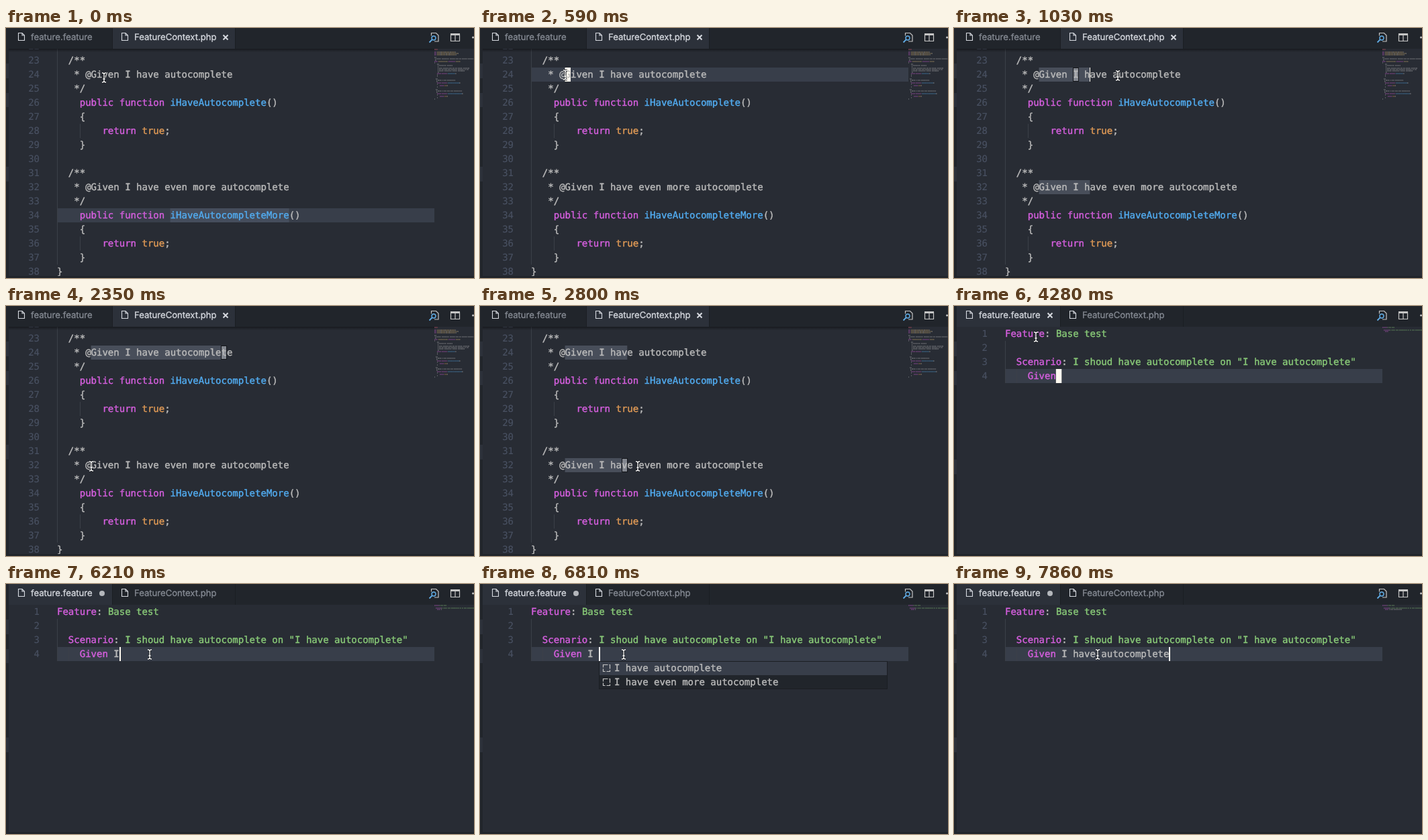
Animation of 697 by 373 pixels, one loop 8000 ms. Source, as an HTML page:

```html
<!DOCTYPE html>
<html lang="en">
<head>
<meta charset="utf-8">
<title>Editor step completion</title>
<style>
html, body { margin: 0; width: 100%; height: 100%; overflow: hidden; background: #282c34; }
svg { display: block; width: 697px; height: 373px; }
text { white-space: pre; text-rendering: geometricPrecision; }
text, tspan { fill: currentColor; stroke: currentColor; }
.code, .num { font: 14px "DejaVu Sans Mono", monospace; stroke-width: .4px; }
.num { stroke-width: .15px; }
.ui { font: 13.1px Inter, "Open Sans", sans-serif; stroke-width: .3px; }
</style>
</head>
<body>
<svg id="stage" viewBox="0 0 697 373"></svg>
<script>
const LOOP = 8000, LEFT = 76, CHAR = 8.428, ROW = 21;
const C = {
  bg: '#282c34', bar: '#21252b', tab: '#2c313a', edge: '#1b1e23', line: '#383e4a',
  sel: '#484e5a', word: '#454d5c', guide: '#3b4048', num: '#495162', text: '#bbbbbb',
  key: '#d55fde', fn: '#52adf2', str: '#89ca78', lit: '#e09a56', type: '#e5c07b',
  red: '#ef596f', cursor: '#fffaf0', block: '#83878f'
};

const phpLines = `<?php

use Behat\\Behat\\Context\\Context;
use Behat\\Gherkin\\Node\\PyStringNode;
use Behat\\Gherkin\\Node\\TableNode;

/**
 * Defines application features from the specific context.
 */
class FeatureContext implements Context
{
    /**
     * Initializes context.
     *
     * Every scenario gets its own context instance.
     * You can also pass arbitrary arguments to the
     * context constructor through behat.yml.
     */
    public function __construct()
    {
    }

  /**
   * @Given I have autocomplete
   */
    public function iHaveAutocomplete()
    {
        return true;
    }

  /**
   * @Given I have even more autocomplete
   */
    public function iHaveAutocompleteMore()
    {
        return true;
    }
}`.split('\n');

const featureLines = [
  'Feature: Base test', '',
  '  Scenario: I shoud have autocomplete on "I have autocomplete"'
];

// Each entry overrides parts of the state before it.
const steps = [
  { t: 0, php: true, mouse: [146, 74], line: 34, word: [34, 20, 21], typed: '    Given ' },
  { t: 140, mouse: [138, 70] },
  { t: 440, mouse: [127, 70] },
  { t: 590, line: 24, word: null, block: [24, 6] },
  { t: 740, mouse: [142, 70], line: 0, sel: [24, 8], block: [24, 7] },
  { t: 890, mouse: [188, 71], sel: [24, 13], block: [24, 12] },
  { t: 1030, mouse: [244, 71], sel: [24, 15], caret: [24, 15] },
  { t: 1180, mouse: [295, 70], sel: [24, 23], block: [24, 22], caret: null },
  { t: 1330, mouse: [321, 68], sel: [24, 29], block: [24, 28] },
  { t: 1480, mouse: [327, 67], sel: [24, 30], block: [24, 29] },
  { t: 1620, mouse: [318, 88] },
  { t: 1770, mouse: [272, 150] },
  { t: 1920, mouse: [205, 215] },
  { t: 2070, mouse: [152, 252] },
  { t: 2200, mouse: [133, 259] },
  { t: 2350, mouse: [127, 239] },
  { t: 2500, line: 32, sel: null, block: [32, 6] },
  { t: 2650, mouse: [146, 238], line: 0, sel: [32, 8], block: [32, 7] },
  { t: 2800, mouse: [235, 239], sel: [32, 17], block: [32, 16] },
  { t: 2950, mouse: [355, 239], sel: [32, 32], block: [32, 31] },
  { t: 3100, mouse: [418, 239], sel: [32, 41], block: [32, 40] },
  { t: 3390, mouse: [370, 186] },
  { t: 3540, mouse: [245, 100] },
  { t: 3690, mouse: [140, 40] },
  { t: 3840, mouse: [105, 19], hand: true },
  { t: 4140, php: false, line: 4, sel: null, block: [4, 9] },
  { t: 4280, mouse: [122, 46], hand: false },
  { t: 4430, mouse: [184, 90] },
  { t: 4580, mouse: [214, 105], word: [4, 4, 5] },
  { t: 5020, block: null, caret: [4, 10] },
  { t: 5170, word: null },
  { t: 5760, caret: null },
  { t: 6210, typed: '    Given I', caret: [4, 11], dirty: true },
  { t: 6660, typed: '    Given I ', caret: [4, 12] },
  { t: 6810, popup: true },
  { t: 7260, caret: null },
  { t: 7860, typed: '    Given I have autocomplete', caret: [4, 29], popup: false }
];

const rect = (x, y, w, h, fill, more = '') =>
  `<rect x="${x}" y="${y}" width="${w}" height="${h}" fill="${fill}" ${more}/>`;
const path = (d, stroke, width = 1, more = 'fill="none"') =>
  `<path d="${d}" stroke="${stroke}" stroke-width="${width}" ${more}/>`;
const escape = s => s.replace(/&/g, '&amp;').replace(/</g, '&lt;');
const label = (x, y, s, color, cls, more = '') =>
  `<text x="${x}" y="${y}" color="${color}" class="${cls}" ${more}>${escape(s)}</text>`;
const colX = col => LEFT + col * CHAR;

function phpColor(word, line) {
  if (/^\s*(\/?\*)/.test(line)) return C.text;
  if (/^(public|function|return|class|use|implements)$/.test(word)) return C.key;
  if (word === 'true') return C.lit;
  if (line.startsWith('<?')) return C.red;
  if (/^(use|class)/.test(line) && /\w/.test(word)) return C.type;
  return /^\w+$/.test(word) ? C.fn : C.text;
}

function tokens(line, php) {
  if (php) return line.split(/(\w+)/).map(s => [s, phpColor(s, line)]);
  const [, indent, key, rest] = line.match(/^(\s*)(\w*)(.*)$/);
  if (key === 'Given') return [[indent, C.text], [key, C.key], [rest, C.text]];
  return [[indent, C.text], [key, C.key], [rest.slice(0, 1), C.text], [rest.slice(1), C.str]];
}

function codeRow(line, y, php) {
  const spans = tokens(line, php).map(([s, color]) => `<tspan color="${color}">${escape(s)}</tspan>`);
  return `<text x="${LEFT}" y="${y + 15}" class="code">${spans.join('')}</text>`;
}

function minimap(lines, php) {
  let out = '';
  lines.forEach((line, i) => {
    let col = 0;
    for (const [s, color] of tokens(line, php)) {
      for (const m of s.matchAll(/\S+/g))
        out += path(`M${638 + col + m.index} ${32 + i * 2}h${m[0].length}`, color, 1.2,
          'stroke-dasharray="1.6 .6" opacity=".62"');
      col += s.length;
    }
  });
  return out;
}

function fileIcon(x, color) {
  return path(`M${x + .5} 7.5h5.5l3.5 3.5v7.5h-9zM${x + 6} 7.5v3.5h3.5`, color, 1.1);
}

const cross = x => path(`M${x - 3.5} 10.5l7 7m0-7l-7 7`, '#d7dae0', 2);

function tabs(s) {
  const on = '#d7dae0', off = '#868b94';
  const first = s.php ? off : on, second = s.php ? on : off;
  let out = rect(0, 0, 697, 31, C.bar);
  out += s.php ? rect(159, 0, 182, 31, C.tab) : rect(4, 0, 154, 31, C.tab);
  out += rect(158, 0, 1, 31, C.edge) + rect(341, 0, 1, 31, C.edge);
  out += fileIcon(18, on) + label(37, 18, 'feature.feature', s.hand && s.php ? '#a0a4ab' : first, 'ui');
  out += fileIcon(172, on) + label(191, 18, 'FeatureContext.php', second, 'ui');
  if (s.php) out += cross(327);
  if (s.dirty) out += '<circle cx="143" cy="14" r="4" fill="#b4b7bc"/>';
  else if (!s.php || s.hand) out += cross(143);
  return out + tools();
}

function tools() {
  const grey = '#c5c5c5', blue = '#62aee8';
  return path('M633.5 11.5v-4h7l3.500 3.500v9h-6', grey, 1.2) +
    `<circle cx="637" cy="15" r="3" fill="none" stroke="${blue}" stroke-width="1.400"/>` +
    path('M634.800 17.200l-4.300 4.300', blue, 1.8) +
    path('M662.500 9.500h13v10h-13zM669 9v11', grey, 1.2) + rect(662, 8, 14, 3, grey) +
    `<circle cx="695.500" cy="14" r="1.500" fill="${grey}"/>`;
}

function sidebar(php) {
  return rect(0, 31, 4, 342, C.bar) + rect(0, 53, 4, 22, C.tab) +
    rect(0, 97, 4, 21, C.tab) + rect(0, php ? 207 : 229, 4, 22, C.tab);
}

function popup() {
  const item = (y, s) => path(`M183.500 ${y + 5.5}h10v10h-10z`, '#c5c5c5', 1.2, 'fill="none" stroke-dasharray="7 2"') +
    label(200, y + 15, s, C.text, 'code');
  return rect(177.5, 115.5, 429, 41, C.bar, `stroke="${C.edge}"`) +
    rect(178, 116, 428, 20, C.line) +
    item(115, 'I have autocomplete') + item(136, 'I have even more autocomplete');
}

function pointer([x, y], hand) {
  if (hand) return `<g transform="translate(${x - 6} ${y - 8})">` +
    path('M3.500 9V2c0-2 2.500-2 2.500 0v4c.5-1 2.300-.8 2.400.3.500-.9 2.200-.6 2.300.5.600-.7 2.100-.3 2.100 1v4c0 2-1.300 2.700-1.300 4.200h-6.500C4.800 13.500 2 12 .7 9.500 0 8 1.700 7 2.700 8z',
      '#111', 1, 'fill="#fff"') + path('M6.700 10v3m2-3v3m2-3v3', '#111', .8) + '</g>';
  const d = `M${x - 3} ${y - 7}q3 0 3 2q0-2 3-2M${x} ${y - 5}v10M${x - 3} ${y + 7}q3 0 3-2q0 2 3 2M${x - 1.5} ${y + 2}h3`;
  return path(d, '#16181c', 3) + path(d, '#fff', 1.3);
}

function draw(s) {
  const lines = s.php ? phpLines : [...featureLines, s.typed];
  const start = s.php ? 22 : 1;
  const rowY = row => s.php ? 38 + (row - 23) * ROW : 31 + (row - 1) * ROW;
  const mark = (row, col, len, fill) => rect(colX(col), rowY(row), len * CHAR, ROW, fill);
  let out = rect(0, 0, 697, 373, C.bg);

  if (s.line) out += rect(76, rowY(s.line), 562, ROW, C.line);
  if (s.php) {
    out += rect(76, 31, 1, 322, C.guide);
    for (const row of [28, 36]) out += rect(110, rowY(row), 1, ROW, C.guide);
  } else {
    out += rect(76, 52, 1, 63, C.guide) + rect(93, 94, 1, ROW, C.guide);
  }
  if (s.word) out += mark(...s.word, C.word);
  if (s.sel) {
    const [row, end] = s.sel;
    out += mark(row, 6, end - 6, C.sel);
    if (end <= 19) out += mark(row === 24 ? 32 : 24, 6, end - 6, C.sel);
  }
  if (s.block) {
    const [row, col] = s.block;
    out += s.sel
      ? rect(Math.round(colX(col)) + .5, rowY(row) + .5, 8, ROW - 1, C.block, 'stroke="#14161a"')
      : mark(row, col, 1, C.cursor);
  }
  for (let row = start; row <= lines.length; row++) {
    out += label(50, rowY(row) + 15, String(row), C.num, 'num', 'text-anchor="end"');
    out += codeRow(lines[row - 1], rowY(row), s.php);
  }
  if (s.caret) out += rect(Math.round(colX(s.caret[1])), rowY(s.caret[0]), s.sel ? 1 : 2, ROW, C.cursor);
  out += minimap(lines, s.php);
  if (s.php) out += rect(4, 31, 634, 5, 'url(#shade)');
  out += rect(0, 370, 697, 3, C.bar) + sidebar(s.php) + tabs(s);
  if (s.popup) out += popup();
  return out + pointer(s.mouse, s.hand);
}

const shade = '<defs><linearGradient id="shade" x2="0" y2="1"><stop stop-opacity=".4"/>' +
  '<stop offset="1" stop-opacity="0"/></linearGradient></defs>';
const stage = document.getElementById('stage');
let shown = -1;

function render(time) {
  const now = time % LOOP;
  const past = steps.filter(step => step.t <= now);
  if (past.length === shown) return;
  shown = past.length;
  stage.innerHTML = shade + draw(Object.assign({}, ...past));
}

const began = performance.now();
function tick() {
  render(performance.now() - began);
  requestAnimationFrame(tick);
}
tick();
</script>
</body>
</html>
```
